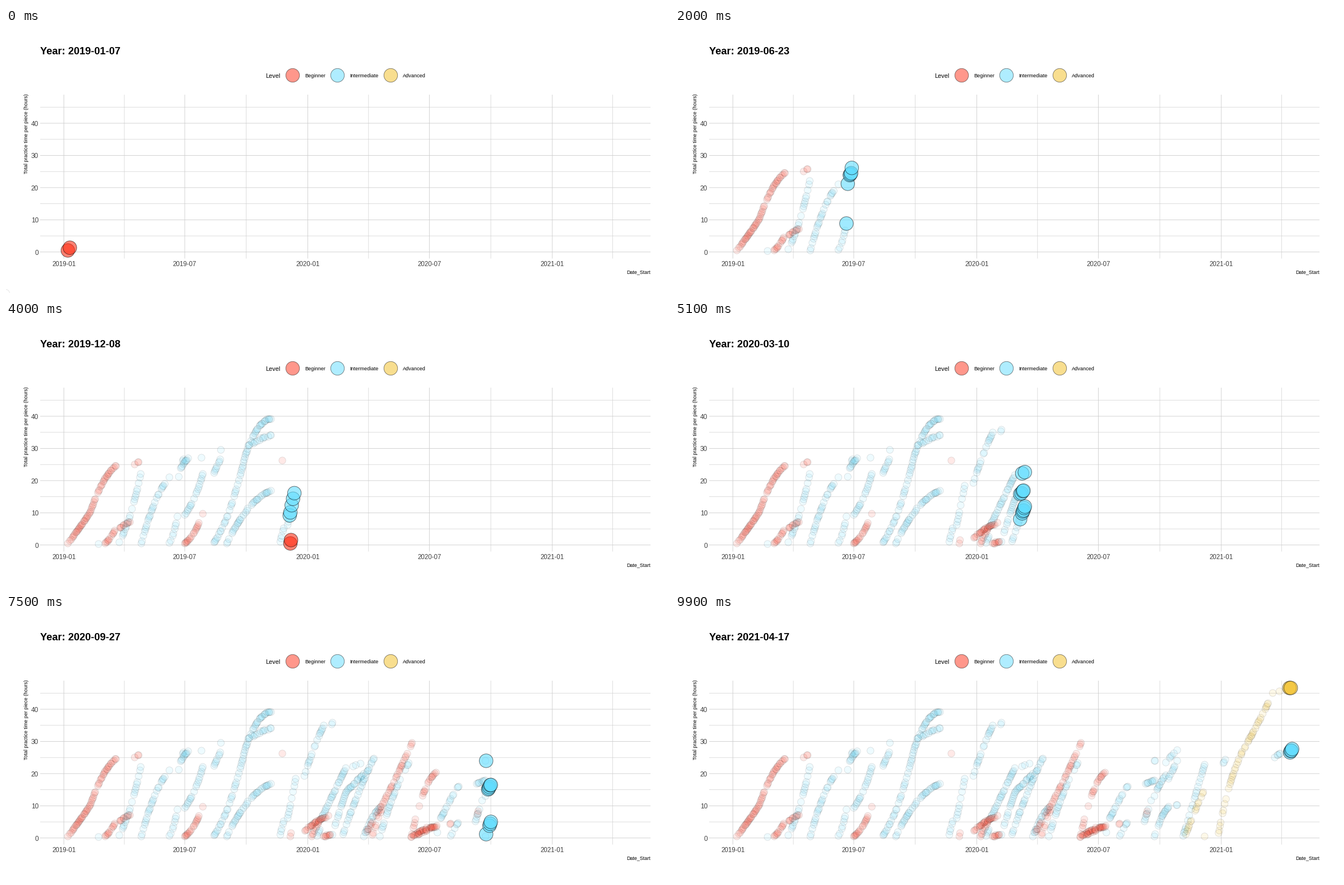
Animation, 1183 px wide and 473 px high, one loop 10000 ms. Source, as a matplotlib script:

```python
import numpy as np
import matplotlib.pyplot as plt
from matplotlib.animation import FuncAnimation
from matplotlib.colors import to_rgba

W, H, DPI = 1183, 473, 64
PT = 72 / DPI                      # points per pixel
FRAMES, INTERVAL = 100, 100
SPAN = 831                         # days from first to last frame
FIRST = np.datetime64("2019-01-07")
X0, PX_DAY = 103.2, 1.1923         # 2019-01-01 and pixels per day
Y0, PX_HOUR = 399.8, 5.745
RED, BLUE, GOLD = "#FF3018", "#61DDFF", "#F3BE21"

plt.rcParams["font.family"] = "Liberation Sans"
rng = np.random.default_rng(7)
days, heights, colors = [], [], []


def trail(color, start, end=None, bend=0, keep=0.6):
    """Practice log of one piece: a bent rise with some days left out."""
    (xa, ya), (xb, yb) = start, end or start
    first, last = (round((x - X0) / PX_DAY) for x in (xa, xb))
    for day in range(first, last + 1):
        inner = first < day < last
        if inner and rng.random() > keep:
            continue
        u = (day - first) / max(last - first, 1)
        rise = u + bend * u * (1 - u)
        days.append(day)
        heights.append(ya + (yb - ya) * rise + inner * rng.normal(0, 0.7))
        colors.append(color)


# 2019
trail(RED, (110, 397), (150, 342), -0.1, keep=0.7)
trail(RED, (151, 340), (196, 259), 0.6, keep=0.7)
trail(BLUE, (165, 398))
trail(RED, (177, 397), (194, 374), -0.4)
trail(BLUE, (202, 395), (240, 273), -0.45)
trail(RED, (203, 369), (221, 359))
trail(RED, (229, 256), (237, 252))
trail(BLUE, (242, 397), (291, 279), 0.55)
trail(BLUE, (291, 396), (306, 349), -0.6)
trail(BLUE, (308, 278), (317, 247), 0.2)
trail(BLUE, (313, 261), (325, 245), 0.3)
trail(RED, (319, 397), (351, 344), -0.6)
trail(BLUE, (319, 346), (351, 273), -0.45)
trail(BLUE, (349, 244))
trail(BLUE, (371, 271), (382, 247))
trail(BLUE, (383.4, 230))
trail(BLUE, (372, 395), (428, 238), -0.5)
trail(BLUE, (394, 397), (473, 303), 0.7)
trail(BLUE, (429, 235), (473, 175), 1)
trail(BLUE, (432, 222), (473, 204), 0.3, keep=0.35)
trail(BLUE, (490, 394), (495, 370))
trail(RED, (492.5, 249))
trail(BLUE, (503, 364), (517, 294))
trail(RED, (507, 397), (509, 391), keep=0)

# 2020
trail(BLUE, (533, 289), (567, 199), 0.2)
trail(RED, (534, 387), (575, 360), 0.4)
trail(RED, (545, 397), (560, 367))
trail(BLUE, (555, 396), (560, 385), keep=0.3)
trail(BLUE, (562, 366), (606, 275))
trail(RED, (567, 397), (579, 394), keep=0.4)
trail(BLUE, (581, 197), (582, 194))
trail(BLUE, (582, 394), (606, 319), 0.1)
trail(BLUE, (602, 393), (657, 258), 0.2)
trail(BLUE, (608, 317), (638, 285))
trail(BLUE, (620, 272), (633, 267), keep=0.3)
trail(BLUE, (638, 397), (667, 346), 0.5)
trail(RED, (645, 388), (724, 230), -0.15)
trail(RED, (654, 394), (670, 350), keep=0.4)
trail(BLUE, (667, 397), (719, 266), 0.35)
trail(RED, (723, 398), (767, 283), 0.75)
trail(RED, (723, 398), (764, 380), 0.7)
trail(RED, (735, 394), (768, 378), keep=0.5)
trail(BLUE, (770, 390), (776, 364), keep=0)
trail(BLUE, (777, 363), (808, 308), 0.2)
trail(RED, (792, 375), (794, 374))
trail(BLUE, (794, 396), (807, 373), 0.3)
trail(BLUE, (838, 370), (849, 333))
trail(RED, (841, 357), (843, 352))
trail(BLUE, (840, 303), (856, 297), keep=0.3)
trail(BLUE, (856, 262), (857, 262))
trail(BLUE, (856, 325), (876, 288), 0.4)
trail(BLUE, (856, 397), (881, 344), 0.5)
trail(BLUE, (876, 265), (896, 243), keep=0.3)
trail(BLUE, (880, 294), (896, 262), keep=0.5)
trail(BLUE, (895, 341), (896, 341))
trail(BLUE, (907, 396), (945, 269))
trail(GOLD, (911, 393), (942, 318), 0.1)
trail(GOLD, (945, 397))

# 2021
trail(GOLD, (970, 391), (1010, 251), 0.5)
trail(GOLD, (1011, 249), (1066, 141), -0.1)
trail(BLUE, (978, 266), (982, 260), keep=0.4)
trail(BLUE, (1070, 256), (1080, 249), keep=0.3)
trail(GOLD, (1078, 138))
trail(GOLD, (1096, 132), (1099, 132), keep=0)
trail(BLUE, (1098, 247), (1101, 241))

order = np.argsort(days, kind="stable")
days = np.array(days)[order]
dots = np.column_stack([X0 + days * PX_DAY, np.array(heights)[order]])
rgba = np.array([to_rgba(c) for c in colors])[order]
moment = np.rint((days - 6) * (FRAMES - 1) / SPAN).astype(int)

fig = plt.figure(figsize=(W / DPI, H / DPI), dpi=DPI, facecolor="white")
ax = fig.add_axes([0, 0, 1, 1])
ax.set(xlim=(0, W), ylim=(H, 0))
ax.axis("off")


def label(x, y, text, px, color="black", **style):
    return ax.text(x, y, text, fontsize=px * PT, color=color, va="baseline",
                   **style)


def dot_layer(radius, edge_alpha, width, zorder):
    return ax.scatter([], [], s=(2 * radius * PT) ** 2, linewidths=width * PT,
                      edgecolors=[(0, 0, 0, edge_alpha)], zorder=zorder)


def fill(layer, mask, alpha):
    faces = rgba[mask]
    faces[:, 3] = alpha
    layer.set_offsets(dots[mask])
    layer.set_facecolors(faces)


def grid(xs, hours, width):
    style = dict(color="#cccccc", lw=width * PT, zorder=1, snap=False)
    ax.vlines(xs, 119, 411.5, **style)
    ax.hlines([Y0 - h * PX_HOUR for h in hours], 61, 1150, **style)


# Grid and axes
months = {"2019-01": 0, "2019-07": 181, "2020-01": 365, "2020-07": 547,
          "2021-01": 731}
breaks = [X0 + d * PX_DAY for d in [*months.values(), 912]]
grid([(a + b) / 2 for a, b in zip(breaks, breaks[1:])], range(5, 50, 10), 0.65)
grid(breaks[:-1], range(0, 50, 10), 0.85)

for x, name in zip(breaks, months):
    label(x, 425.3, name, 11.5, "#404040", ha="center")
for hour in range(0, 50, 10):
    label(58, Y0 - hour * PX_HOUR + 4.8, str(hour), 11.8, "#404040",
          ha="right")
label(1150, 438.5, "Date_Start", 8.85, ha="right")
label(39.5, 260, "Total practice time per piece (hours)", 8.9, rotation=90,
      rotation_mode="anchor", ha="left")
title = label(61, 47, "", 18.2, weight="bold")

# Legend
label(463, 89, "Level", 10.9)
for x, color, name in [(511, RED, "Beginner"), (591, BLUE, "Intermediate"),
                       (686.3, GOLD, "Advanced")]:
    key = dot_layer(12.2, 0.5, 0.9, 3)
    key.set_offsets([(x, 84.3)])
    key.set_facecolors([to_rgba(color, 0.5)])
    label(x + 21.8, 88, name, 9.1)

past = dot_layer(6.2, 0.13, 0.8, 4)
current = dot_layer(12.2, 0.6, 0.9, 5)


def update(frame):
    title.set_text(f"Year: {FIRST + SPAN * frame // (FRAMES - 1)}")
    fill(past, moment < frame, 0.1)
    fill(current, moment == frame, 0.6)
    return title, past, current


anim = FuncAnimation(fig, update, frames=FRAMES, interval=INTERVAL,
                     repeat=True, repeat_delay=0)
plt.show()
```
